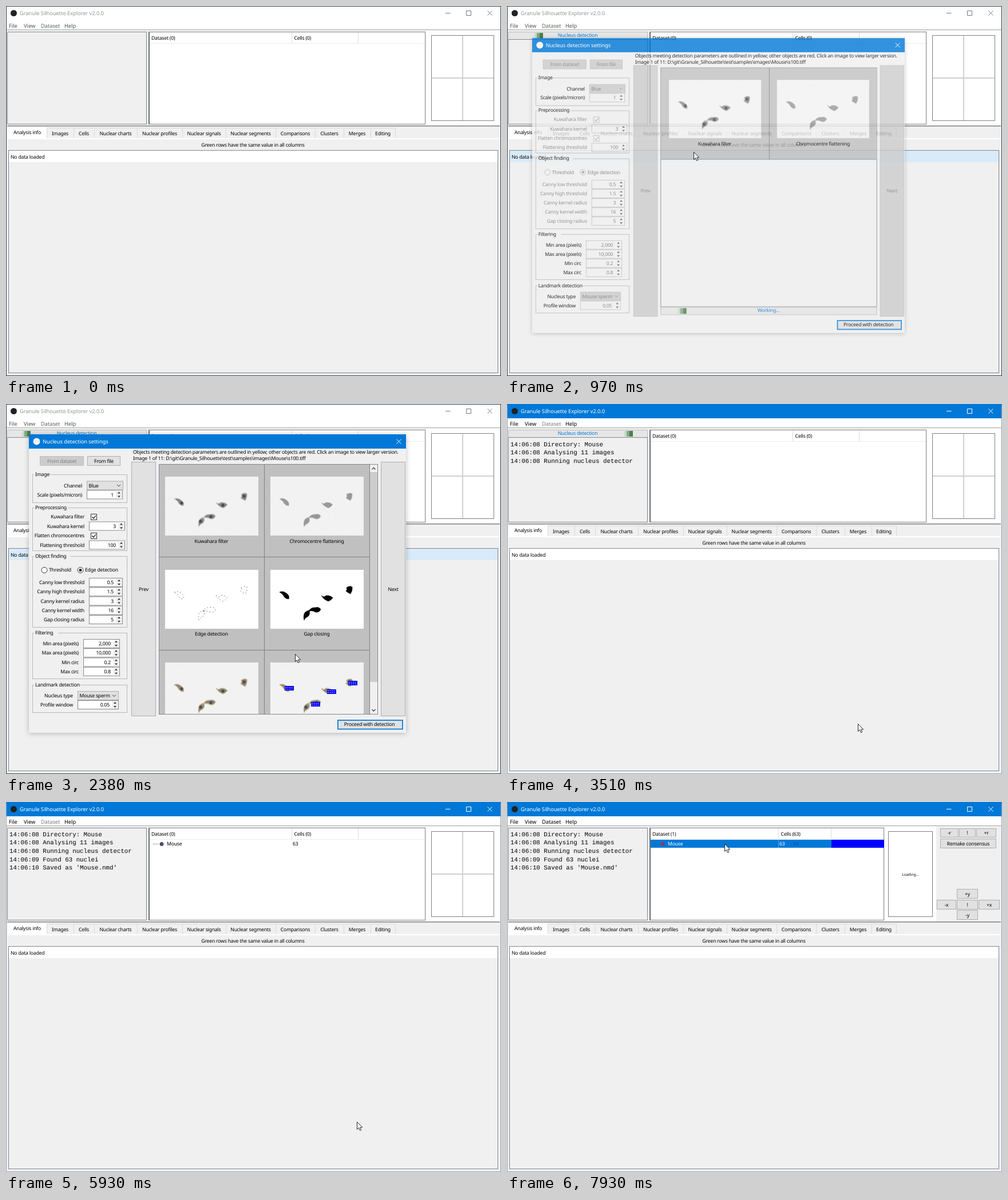
Animation of 865x647 px, one loop 8 s. Source, as an HTML page:

```html
<!DOCTYPE html>
<html lang="en">
<head>
<meta charset="utf-8">
<title>Nucleus detection</title>
<style>
html, body { margin: 0; width: 100%; height: 100%; overflow: hidden; background: #f0f0f0; }
svg { display: block; }
text { font: 8.7px "Noto Sans", "Open Sans", sans-serif; letter-spacing: -.235px; text-rendering: geometricPrecision; white-space: pre; }
.ui { font-size: 9.4px; letter-spacing: -.08px; }
.log { font: 10.8px "Liberation Mono", "Courier New", monospace; letter-spacing: 0; }
.tiny { font-size: 6.4px; letter-spacing: 0; }
.shadow { filter: drop-shadow(0 1px 4px rgba(0, 0, 0, .26)); }
</style>
</head>
<body>
<script>
const LOOP = 8000;
const BLUE = '#0078d7', EDGE = '#828790', FACE = '#f0f0f0';

function el(parent, tag, attrs = {}) {
  const node = document.createElementNS('http://www.w3.org/2000/svg', tag);
  for (const k in attrs) node.setAttribute(k, attrs[k]);
  parent.append(node);
  return node;
}
const group = parent => el(parent, 'g');
const fill = (p, x, y, x2, y2, color) => el(p, 'rect', { x, y, width: x2 - x, height: y2 - y, fill: color });
const box = (p, x, y, x2, y2, color, stroke) =>
  el(p, 'rect', { x: x + .5, y: y + .5, width: x2 - x, height: y2 - y, fill: color, stroke });
const path = (p, d, stroke, width = 1, color = 'none') =>
  el(p, 'path', { d, stroke, 'stroke-width': width, fill: color });
const dot = (p, cx, cy, r, color, stroke = 'none') => el(p, 'circle', { cx, cy, r, fill: color, stroke });
const view = (p, x, y, width, height) =>
  el(p, 'svg', { x, y, width, height, viewBox: [x, y, width, height].join(' ') });

// y is the middle of the capitals
function label(p, x, y, str, color = '#000', anchor = 'start', cls = '') {
  const size = { ui: 9.4, log: 9.6, tiny: 6.4 }[cls] || 8.7;
  const node = el(p, 'text', { x, y: y + size * .36, fill: color, 'text-anchor': anchor, class: cls });
  node.textContent = str;
  return node;
}
function button(p, x, y, x2, y2, str, on = true) {
  box(p, x, y, x2, y2, on ? '#e1e1e1' : '#cccccc', on ? '#adadad' : '#bfbfbf');
  label(p, (x + x2) / 2 + .5, (y + y2) / 2 + .5, str, on ? '#000' : '#808080', 'middle');
}
function swingBar(p, x, y, x2, y2, str) {
  const g = group(p);
  box(g, x, y, x2, y2, '#e6e6e6', '#bcbcbc');
  const clip = view(g, x + 1, y + 1, x2 - x - 1, y2 - y - 1);
  const block = group(clip);
  fill(block, 0, y + 2, 4, y2 - 1, '#c6dac6');
  fill(block, 4, y + 2, 9, y2 - 1, '#7faa80');
  fill(block, 9, y + 2, 15, y2 - 1, '#4a7f4a');
  label(g, (x + x2) / 2, (y + y2) / 2 - .8, str, BLUE, 'middle');
  return { g, block };
}

const stage = el(document.body, 'svg', { width: 865, height: 647, viewBox: '0 0 865 647' });
const timed = [];
const during = (node, from, to) => { timed.push([node, from, to]); return node; };

// ---- main window ----
fill(stage, 0, 0, 865, 647, FACE);
fill(stage, 0, 25, 865, 41, '#fff');
fill(stage, 0, 41, 865, 42, '#a8a8a8');

function chrome(active) {
  const g = group(stage), ink = active ? '#fff' : '#777';
  fill(g, 0, 0, 865, 25, active ? BLUE : '#fff');
  dot(g, 13.5, 12.5, 5.5, '#222');
  label(g, 24, 12.8, 'Granule Silhouette Explorer v2.0.0', active ? '#fff' : '#8f9a8f', 'start', 'ui');
  path(g, 'M768 12.5h8.5M804.500 8.500h8v8h-8zM841.500 8.500l8 8m0-8l-8 8', ink);
  box(g, 0, 0, 864, 646, 'none', active ? '#8fa3b5' : '#33414f');
  if (active) fill(g, 0, 0, 865, 2, BLUE);
  [['File', 5], ['View', 31], ['Help', 102]].forEach(([s, x]) =>
    label(g, x, 34.3, s, active ? '#000' : '#4c584c', 'start', 'ui'));
  return g;
}
during(chrome(false), 0, 2940);
during(chrome(true), 2940, LOOP);
[['#5c685c', 0, 2940], ['#7c7c7c', 2940, 7930], ['#000', 7930, LOOP]].forEach(([c, a, b]) =>
  during(label(stage, 61, 34.3, 'Dataset', c, 'start', 'ui'), a, b));

// log panel
box(stage, 2, 45, 245, 206, FACE, EDGE);
const job = swingBar(stage, 2, 45, 245, 58, 'Nucleus detection');
path(job.g, 'M2 58.500H246', EDGE);
during(job.g, 330, 5930);
const log = group(stage);
[['14:06:08 Directory: Mouse', 3010], ['14:06:08 Analysing 11 images', 3010],
 ['14:06:08 Running nucleus detector', 3010], ['14:06:09 Found 63 nuclei', 4710],
 ["14:06:10 Saved as 'Mouse.nmd'", 5930]].forEach(([s, from], i) =>
  during(label(log, 6, 56.3 + 14.6 * i, s, '#000', 'start', 'log'), from, LOOP));

// dataset table
function table(right, c1, c2, head1, head2) {
  const g = group(stage);
  box(g, 249, 45, right, 206, '#fff', EDGE);
  fill(g, 249, 45, 251, 207, '#6b7078');
  fill(g, c1, 46, c1 + 1, 66, '#dcdcdc');
  fill(g, c2, 46, c2 + 1, 66, '#dcdcdc');
  fill(g, 251, 65, right, 66, '#ececec');
  label(g, 254, 56.3, head1);
  label(g, c1 + 4.5, 56.3, head2);
  return g;
}
function row(p, x, ink, mark) {
  path(p, 'M257 73.500h9', mark, 1).setAttribute('stroke-dasharray', '1 1');
  dot(p, 272, 73.5, 3.5, mark);
  label(p, 281, 73.3, 'Mouse', ink);
  label(p, x, 73.3, '63', ink);
}
const before = during(group(stage), 0, 7930);
fill(before, 734, 43, 863, 209, '#fff');
before.append(table(732, 499, 615, 'Dataset (0)', 'Cells (0)'));
box(before, 743, 51, 852, 200, '#fff', '#808080');
fill(before, 797, 52, 799, 200, '#d0d0d0');
fill(before, 744, 125, 852, 127, '#d0d0d0');
row(during(group(before), 5930, 7650), 501, '#000', '#5a4a66');
const picked = during(group(before), 7650, 7930);
fill(picked, 251, 66, 617, 81, BLUE);
row(picked, 501, '#fff', '#7a4468');

const after = during(group(stage), 7930, LOOP);
fill(after, 660, 43, 750, 209, '#fff');
after.append(table(658, 474, 566, 'Dataset (1)', 'Cells (63)'));
fill(after, 251, 66, 567, 80, BLUE);
fill(after, 567, 66, 659, 80, '#0000ff');
fill(after, 474, 66, 475, 80, '#5aa5e2');
row(after, 476, '#fff', '#7a4468');
label(after, 500, 73.3, '63', '#1c3fb0');
box(after, 666, 51, 743, 200, '#fff', '#808080');
label(after, 705, 127, 'Loading...', '#000', 'middle', 'tiny');
[[757, 46, 788, 61, '-r'], [790, 46, 818, 61, '!'], [820, 46, 854, 61, '+r'],
 [757, 64, 854, 80, 'Remake consensus'], [786, 152, 822, 168, '+y'], [751, 171, 784, 187, '-x'],
 [786, 171, 822, 187, '!'], [824, 171, 860, 187, '+x'], [786, 189, 822, 205, '-y']]
  .forEach(b => button(after, ...b));

// tabs
fill(stage, 2, 209, 863, 210.5, '#808080');
const edges = [71, 118, 154, 229, 308, 384, 471, 540, 590, 637, 680];
['Images', 'Cells', 'Nuclear charts', 'Nuclear profiles', 'Nuclear signals', 'Nuclear segments',
 'Comparisons', 'Clusters', 'Merges', 'Editing'].forEach((s, i) => {
  box(stage, edges[i], 213, edges[i + 1], 231, FACE, '#dadada');
  label(stage, (edges[i] + edges[i + 1]) / 2, 223, s, '#000', 'middle');
});
fill(stage, 2, 231, 862, 233, '#fff');
fill(stage, 3, 211, 71, 232, '#fff');
label(stage, 37, 221.3, 'Analysis info', '#000', 'middle');
label(stage, 431.5, 243, 'Green rows have the same value in all columns', '#000', 'middle');
box(stage, 4, 252, 859, 641, FACE, EDGE);
fill(stage, 5, 253, 859, 273, '#fff');
during(fill(stage, 5, 253, 859, 273, '#d9ebf9'), 330, 2940);
label(stage, 8, 264, 'No data loaded');

// ---- settings dialog ----
const dialog = group(stage);
fill(dialog, 40, 53, 699, 575, FACE).setAttribute('class', 'shadow');
fill(dialog, 40, 53, 699, 78, BLUE);
dot(dialog, 53.5, 65.5, 6, '#f4f4f4');
label(dialog, 64, 66, 'Nucleus detection settings', '#fff', 'start', 'ui');
path(dialog, 'M682.500 61.500l8 8m0-8l-8 8', '#fff');
label(dialog, 222, 84, 'Objects meeting detection parameters are outlined in yellow; other objects are red. Click an image to view larger version.');
label(dialog, 222, 95.3, 'Image 1 of 11: D:\\git\\Granule_Silhouette\\test\\samples\\images\\Mouse\\s100.tiff');

function controls(on) {
  const g = group(dialog), ink = on ? '#000' : '#787878';
  const field = (x, y, x2) => box(g, x, y - 8, x2, y + 7, on ? '#fff' : FACE, on ? '#8a8a8a' : '#c2c2c2');
  const name = (x, y, s) => label(g, x, y, s, '#000', 'end');
  const dim = (x, y, s) => label(g, x, y, s, on ? '#000' : '#808080', 'end');
  const frame = (y, y2, s) => {
    box(g, 46, y, 211, y2, 'none', '#b8b8b8');
    fill(g, 49, y - 2, 53 + s.length * 4.25, y + 3, FACE);
    label(g, 51, y - .3, s);
  };
  const spin = (x, y, x2, value) => {
    field(x, y, x2);
    fill(g, x2 - 11, y - 7, x2, y + 7, FACE);
    path(g, `M${x2 - 8} ${y - 2}l2.500 -3 2.500 3zM${x2 - 8} ${y + 2}l2.500 3 2.500 -3z`, 'none', 1, on ? '#333' : '#666');
    label(g, x2 - 15, y, value, ink, 'end');
  };
  const combo = (x, y, x2, value) => {
    box(g, x, y - 8, x2, y + 7, on ? '#e1e1e1' : '#cccccc', on ? '#adadad' : '#bfbfbf');
    label(g, x + 3.5, y, value, ink);
    path(g, `M${x2 - 10} ${y - 1.5}l3 3 3 -3`, on ? '#333' : '#999');
  };
  const check = y => {
    box(g, 148, y - 5, 158, y + 5, on ? '#fff' : FACE, on ? '#333' : '#bbb');
    path(g, `M150.500 ${y + .5}l2.500 2.500 4 -5`, on ? '#000' : '#aaa', 1.2);
  };
  const radio = (x, s, set) => {
    dot(g, x, 290.5, 5, on ? '#fff' : FACE, on ? '#333' : '#bbb');
    if (set) dot(g, x, 290.5, 2.5, on ? '#222' : '#aaa');
    label(g, x + 8, 290.3, s, ink);
  };

  button(g, 59, 91, 135, 107, 'From dataset', false);
  button(g, 142, 91, 199, 107, 'From file', on);
  frame(123, 172, 'Image');
  name(133, 142.5, 'Channel');
  combo(141, 142.5, 204, 'Blue');
  name(133, 158.5, 'Scale (pixels/micron)');
  spin(141, 158.5, 203, '1');

  frame(181, 256, 'Preprocessing');
  dim(137, 197, 'Kuwahara filter');
  check(197);
  dim(137, 213.5, 'Kuwahara kernel');
  spin(145, 213.5, 207, '3');
  dim(137, 230, 'Flatten chromocentres');
  check(230);
  dim(137, 246.5, 'Flattening threshold');
  spin(145, 246.5, 207, '100');

  frame(266, 390, 'Object finding');
  radio(67, 'Threshold', false);
  radio(130, 'Edge detection', true);
  [['Canny low threshold', '0.5'], ['Canny high threshold', '1.5'], ['Canny kernel radius', '3'],
   ['Canny kernel width', '16'], ['Gap closing radius', '5']].forEach(([s, v], i) => {
    dim(137, 312 + 16.25 * i, s);
    spin(145, 312 + 16.25 * i, 203, v);
  });

  frame(400, 480, 'Filtering');
  [['Min area (pixels)', '2,000'], ['Max area (pixels)', '10,000'], ['Min circ', '0.2'],
   ['Max circ', '0.8']].forEach(([s, v], i) => {
    name(127, 419 + 16.25 * i, s);
    spin(135, 419 + 16.25 * i, 198, v);
  });

  frame(491, 539, 'Landmark detection');
  name(117, 510, 'Nucleus type');
  combo(125, 510, 196, 'Mouse sperm');
  name(117, 526, 'Profile window');
  spin(125, 526, 196, '0.05');

  button(g, 219, 101, 261, 545, 'Prev', on);
  button(g, 655, 101, 697, 545, 'Next', on);
  return g;
}
during(controls(false), 0, 2040);
during(controls(true), 2040, LOOP);

// ---- image previews ----
const CELLS = 'M16 39Q22 36 28 41Q34 45 32 51Q27 51 24 47Q22 42 16 39Z' +
  'M89 45Q94 49 97 45Q104 44 109 49Q105 54 101 55Q93 52 89 45Z' +
  'M133 31Q139 27 143 30Q144 36 140 42Q135 40 132 37Q135 35 133 31Z' +
  'M68 71Q70 79 65 82Q60 84 59 88Q57 80 60 75Q64 71 68 71Z' +
  'M66 73Q71 65 78 66Q85 64 88 69Q86 75 79 74Q72 70 66 73Z';
const CORES = [[29, 46], [101, 50], [138, 34], [62, 78], [80, 70]];
const TAGS = [[25, 41], [99, 47], [136, 32], [71, 69]];
const BLANK = 6;
let seed = 7;
const rnd = n => (seed = seed * 16807 % 2147483647) % n;
let GRAIN = '';
for (let i = 0; i < 260; i++) GRAIN += `M${rnd(162)} ${rnd(102)}h1v1h-1z`;

function photo(p, kind) {
  if (kind === BLANK) return fill(p, 0, -21, 163, 103, '#fff');
  const plain = kind === 2 || kind === 3;
  fill(p, 0, 0, 163, 103, plain ? '#fff' : '#f2f2f2');
  if (!plain) path(p, GRAIN, 'none', 1, '#eaeaea');
  if (kind === 2) path(p, CELLS, '#000').setAttribute('stroke-dasharray', '1 4.300');
  else if (kind === 3) path(p, CELLS, '#000', .6, '#000');
  else if (kind === 1) path(p, CELLS, '#c0c0c0', .8, '#989898');
  else {
    path(p, CELLS, '#c8c8c8', 1.2, '#858585');
    CORES.forEach(([x, y]) => dot(p, x, y, 2.6, '#4c4c4c'));
    if (kind > 3) path(p, CELLS, '#d8b050', .8);
  }
  if (kind === 5) TAGS.forEach(([x, y]) => {
    fill(p, x, y, x + 16, y + 8, '#0000f0');
    path(p, `M${x + 1} ${y + 2.5}h14m-14 3h14`, '#d8d8ff').setAttribute('stroke-dasharray', '2 1.500');
  });
}
const STEPS = ['Kuwahara filter', 'Chromocentre flattening', 'Edge detection', 'Gap closing', '', ''];

function previews(kinds, scroll, bottom) {
  const g = group(dialog);
  box(g, 267, 105, 649, bottom, FACE, EDGE);
  const v = view(g, 268, 106, 381, bottom - 106);
  const w = scroll ? 184 : 191.5;
  kinds.forEach((kind, i) => {
    const x = 267 + w * (i % 2), y = 105 + 162.5 * (i >> 1);
    const cell = group(v);
    box(cell, Math.round(x), Math.floor(y), Math.round(x + w), Math.floor(y + 162.5), '#c0c0c0', '#808080');
    const pic = group(cell);
    pic.setAttribute('transform', `translate(${Math.round(x + w / 2 - 81)} ${Math.round(y + 22)})`);
    photo(pic, kind);
    label(cell, x + w / 2, y + 134.7, STEPS[i], '#000', 'middle');
  });
  if (scroll) {
    fill(g, 636, 106, 649, bottom, FACE);
    fill(g, 636, 119, 649, bottom === 528 ? 462 : 486, '#cdcdcd');
    path(g, `M639.500 114.500l3 -3 3 3M639.500 ${bottom - 8}l3 3 3 -3`, '#444', 1.3);
  }
  return g;
}
during(previews([0, 1], false, 528), 0, 1170);
during(previews([0, 1, 2], false, 528), 1170, 1240);
during(previews([0, 1, 2, 3], false, 528), 1240, 1310);
during(previews([0, 1, 2, 3, 4, BLANK], true, 528), 1310, 2040);
during(previews([0, 1, 2, 3, 4, 5], true, 542), 2040, LOOP);

const work = swingBar(dialog, 267, 529, 649, 542, 'Working...');
during(work.g, 0, 2040);

function proceed(color) {
  const g = group(dialog);
  el(g, 'rect', { x: 580, y: 553, width: 113, height: 15.5, fill: color, stroke: BLUE, 'stroke-width': 1.7 });
  label(g, 635, 560.3, 'Proceed with detection', '#000', 'middle');
  return g;
}
during(proceed('#e1e1e1'), 0, 2660);
during(proceed('#e5f1fb'), 2660, LOOP);

const cursor = path(stage, 'M0 0V13L3 10.200 5 15 7.200 14 5.200 9.500H9.200Z', '#223', 1, '#fff');
during(cursor, 330, LOOP);

// ---- motion ----
// time, opacity, scale
const FADE = [[0, 0, .9], [900, .35, .955], [970, .8, .988], [1040, .96, .997], [1110, 1, 1],
  [2870, .6, .97], [2940, .15, .93], [3010, 0, .9]];
// time, x, y
const POINTER = [[0, 326, 255], [2040, 326, 255], [2380, 505, 437], [2660, 613, 559],
  [6810, 613, 559], [7580, 380, 73], [LOOP, 380, 73]];

function pointerAt(t) {
  const i = POINTER.findIndex(k => k[0] > t);
  const [a, x, y] = POINTER[i - 1], [b, x2, y2] = POINTER[i];
  let u = (t - a) / (b - a);
  if (a > 6000) u = u * u * (3 - 2 * u);
  return [x + (x2 - x) * u, y + (y2 - y) * u];
}
const wrap = (v, span) => (v % span + span) % span;

function render(t) {
  for (const [node, from, to] of timed) node.style.display = t >= from && t < to ? '' : 'none';

  // the job bar stalls briefly before the count is reported
  const busy = t > 4510 && t < 4710 ? 4510 : t;
  job.block.setAttribute('transform', `translate(${Math.round(2 + wrap(45.5 + .157 * (busy - 970), 241))} 0)`);
  work.block.setAttribute('transform', `translate(${Math.round(267 + wrap(31 + .268 * (t - 970), 382))} 0)`);
  log.setAttribute('transform', `translate(0 ${t < 5930 ? 14 : 0})`);

  const [, alpha, scale] = FADE.filter(k => k[0] <= t).pop();
  dialog.style.display = alpha ? '' : 'none';
  dialog.setAttribute('opacity', alpha);
  dialog.setAttribute('transform', `translate(369.500 314) scale(${scale}) translate(-369.500 -314)`);

  const [x, y] = pointerAt(t);
  cursor.setAttribute('transform', `translate(${Math.round(x) + .5} ${Math.round(y) + .5})`);
}

const start = performance.now();
function tick() {
  render((performance.now() - start) % LOOP);
  requestAnimationFrame(tick);
}
tick();
</script>
</body>
</html>
```
